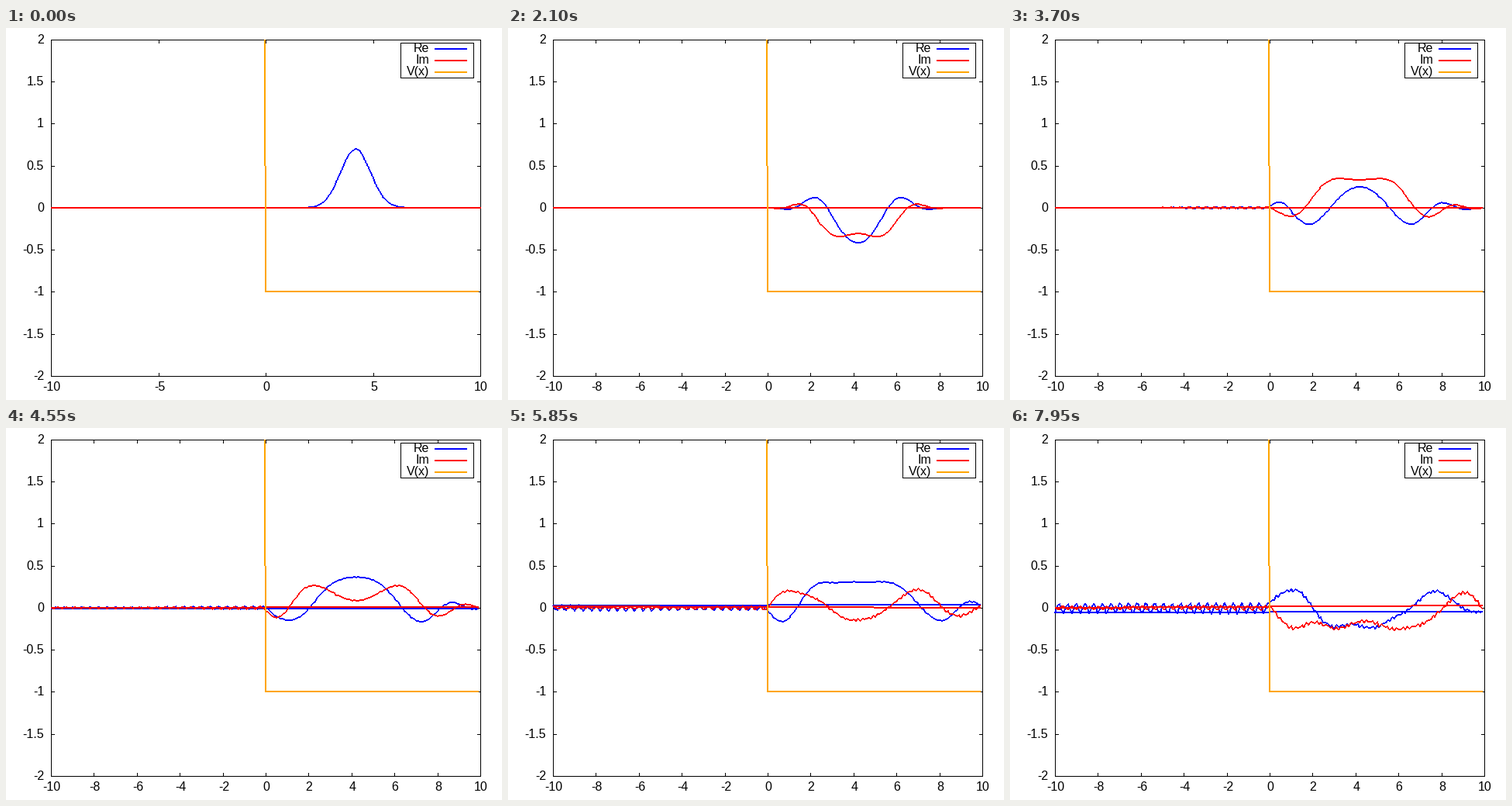
A matplotlib script that plays this animation: 640 by 480 pixels, repeating every 8 s.

```python
import numpy as np
import matplotlib.pyplot as plt
from matplotlib.animation import FuncAnimation

W, H, DPI = 640, 480, 100
FRAMES, INTERVAL = 160, 50
LEFT, RIGHT, TOP, BOTTOM = 58, 612, 15, 449
PX = 72 / DPI
FONT = dict(family="Liberation Sans", size=16 * PX, color="black")
BLUE, RED, ORANGE = (0, 0, 255, 255), (255, 0, 0, 255), (255, 165, 0, 255)

# Wave packet beside a potential step, split-operator steps
N, L, DT = 200, 20.0, 0.7
x = (np.arange(N) - N // 2) * L / N
V = np.where(x < 0, 5.0, -1.0)
kick = np.exp(-1j * V * DT)
drift = np.exp(-0.5j * DT * np.fft.fftfreq(N, L / N) ** 2)


def evolve():
    psi = 0.7 * np.exp(-((x - 4.19) / 0.7) ** 2 / 2) + 0j
    states = [psi]
    for _ in range(FRAMES - 1):
        psi = np.fft.ifft(drift * np.fft.fft(kick * psi))
        states.append(psi)
    return states


def to_px(v):
    p = LEFT + (np.asarray(v) + 10) * (RIGHT - LEFT) / 20
    return np.floor(p + 0.5).astype(int)


def to_py(v):
    p = TOP + (2 - np.asarray(v)) * (BOTTOM - TOP) / 4
    return np.ceil(p - 0.5).astype(int)


def paint(img, xs, ys, color):
    """Two-pixel polyline, thickened across its main direction."""
    for x0, y0, x1, y1 in zip(xs[:-1], ys[:-1], xs[1:], ys[1:]):
        dx, dy = x1 - x0, y1 - y0
        t = np.linspace(0, 1, max(abs(dx), abs(dy)) + 1)
        px = np.rint(x0 + dx * t).astype(int)
        py = np.rint(y0 + dy * t).astype(int)
        img[py, px] = color
        if abs(dy) > abs(dx):
            img[py, px - 1] = color
        else:
            img[py - 1, px] = color


states = evolve()

fig = plt.figure(figsize=(W / DPI, H / DPI), dpi=DPI, facecolor="white")
ax = fig.add_axes([0, 0, 1, 1])
ax.axis("off")


def thin(xs, ys):
    """One-pixel black line through pixel centres."""
    line, = ax.plot(np.array(xs) + 0.5, np.array(ys) + 0.5, color="black",
                    lw=PX, antialiased=False, snap=False, zorder=1,
                    solid_capstyle="projecting")
    return line


def box(x0, y0, x1, y1):
    thin([x0, x1, x1, x0, x0], [y0, y0, y1, y1, y0])


def label(px, py, s, ha):
    return ax.text(px, py, s, ha=ha, va="baseline", **FONT)


def x_ticks(step):
    parts = []
    for v in range(-10, 11, step):
        p = to_px(v)
        for a, b in ((TOP, TOP + 4), (BOTTOM - 4, BOTTOM)):
            parts.append(thin([p, p], [a, b]))
        parts.append(label(p + 1, 468, str(v), "center"))
    return parts


box(LEFT, TOP, RIGHT, BOTTOM)
for v in np.arange(-2, 2.1, 0.5):
    p = to_py(v)
    for a, b in ((LEFT, LEFT + 4), (RIGHT - 4, RIGHT)):
        thin([a, b], [p, p])
    label(49, p + 5, f"{v:g}", "right")
coarse, fine = x_ticks(5), x_ticks(2)

blank = np.zeros((H, W, 4), np.uint8)
box(509, 19, 603, 64)
for i, (name, color) in enumerate(
        (("Re", BLUE), ("Im", RED), ("V(x)", ORANGE))):
    label(546, 31 + 15 * i, name, "right")
    paint(blank, [553, 594], [27 + 15 * i] * 2, color)

wall_x = to_px([-0.05, 0, x[-1]])
wall_y = to_py([2, -1, -1])
layer = ax.imshow(blank, extent=(0, W, H, 0), aspect="auto",
                  interpolation="nearest", zorder=4)
ax.set_xlim(0, W)
ax.set_ylim(H, 0)


def draw(i):
    for part in coarse:
        part.set_visible(i == 0)
    for part in fine:
        part.set_visible(i > 0)
    psi = states[i]
    if i == 0:
        xs, ys = np.append(x, 10), np.append(psi, 0)
    else:
        # the curve is joined to the last point of the step before
        xs, ys = np.append(x[-1], x), np.append(states[i - 1][-1], psi)
    img = blank.copy()
    px = to_px(xs)
    paint(img, px, to_py(ys.real), BLUE)
    paint(img, px, to_py(ys.imag), RED)
    paint(img, wall_x, wall_y, ORANGE)
    layer.set_data(img)
    return [layer]


anim = FuncAnimation(fig, draw, frames=FRAMES, interval=INTERVAL,
                     init_func=lambda: draw(0), repeat=True, repeat_delay=0)
plt.show()
```
